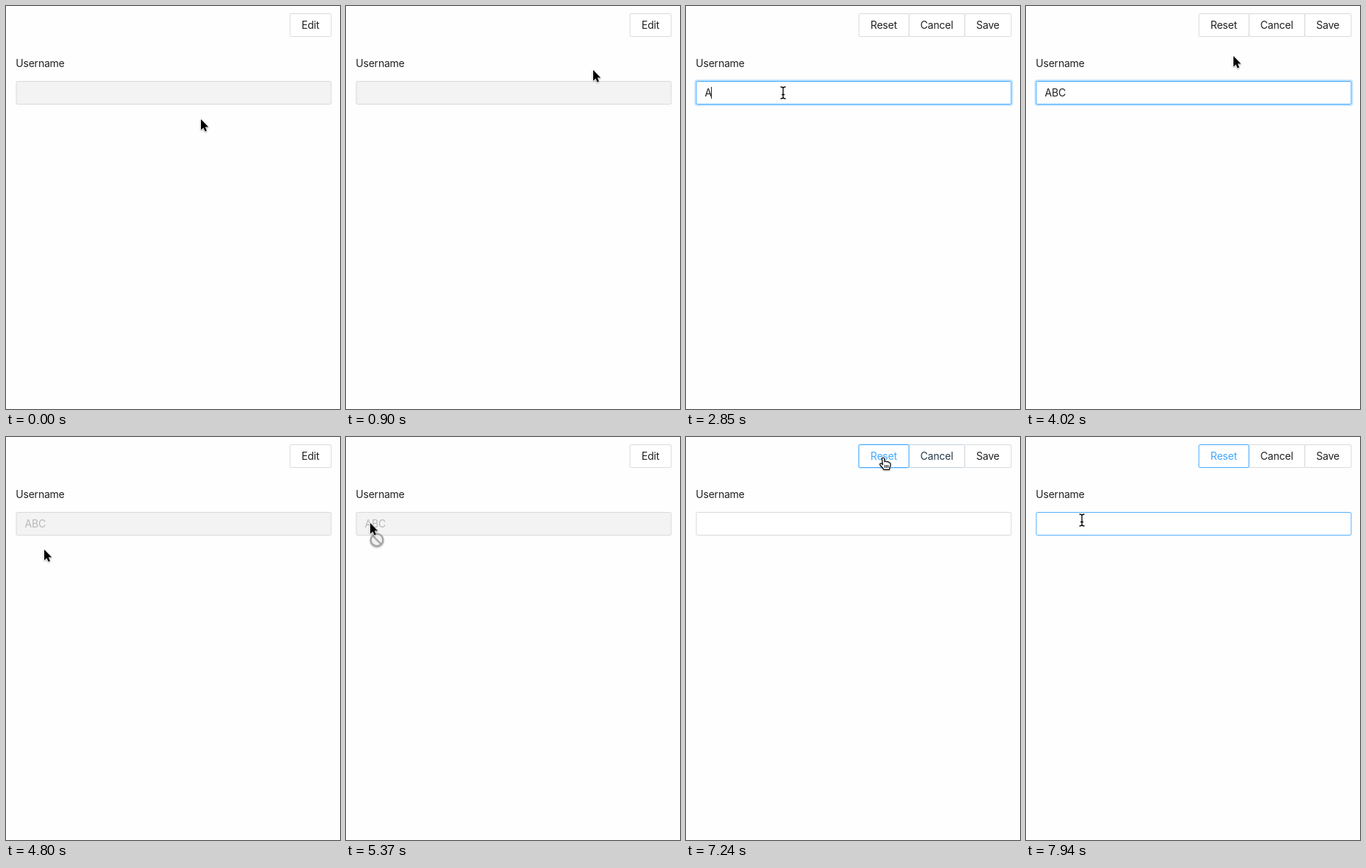
Recreate the animation shown at these times as an HTML page. Size 454 by 548 pixels, loop 8 s.

```html
<!DOCTYPE html>
<html lang="en">
<head>
<meta charset="utf-8">
<title>Editable form</title>
<style>
  html, body { margin: 0; width: 100%; height: 100%; overflow: hidden; background: #fefefe; }
  svg { display: block; width: 454px; height: 548px; }
  text { font: 14px Inter, Roboto, sans-serif; letter-spacing: -.22px; fill: #222; }
  .btn text { text-anchor: middle; }
  .btn rect { fill: #fff; }
  .arrow { fill: #000; stroke: #fff; stroke-width: 1; paint-order: stroke; filter: drop-shadow(0 1px 1px rgba(0,0,0,.35)); }
  .hand { fill: #fff; stroke: #000; stroke-width: 1.2; stroke-linejoin: round; filter: drop-shadow(0 1px 1px rgba(0,0,0,.3)); }
  .badge { fill: #f0f0f0; stroke: #a6a6a6; stroke-width: 2.4; filter: drop-shadow(0 1px 1px rgba(0,0,0,.3)); }
  .beam { fill: none; stroke: #000; stroke-width: 1.3; }
  .halo { stroke: #fff; stroke-width: 3; }
</style>
</head>
<body>
<svg viewBox="0 0 454 548">
  <rect id="wave" fill="none" stroke="#1890ff"/>
  <g id="buttons"></g>
  <text x="13.3" y="83">Username</text>
  <rect id="glow" x="12.5" y="101" width="431" height="34" rx="3" fill="none" stroke="#1890ff" stroke-width="2"/>
  <rect id="field" x="14" y="102.5" width="428" height="31" rx="1.5"/>
  <text id="value" x="25.5" y="123"></text>
  <path id="caret" d="M0 110v16" stroke="#222"/>
  <g id="pointer">
    <g id="denied" class="badge">
      <circle cx="9" cy="23" r="8.3"/>
      <path d="M3 17L15 29"/>
    </g>
    <path id="arrow" class="arrow" d="M0 0V14.5L3.4 11.4 5.6 16.6 7.9 15.6 5.7 10.5H10.2Z"/>
    <g id="hand" class="hand">
      <path d="M-1.6 1.5Q-1.5 0 0 0Q1.3 0 1.5 1.5L2 5.6Q2.6 4.6 3.9 5Q4.9 5.2 5 6Q6 5.2 7.1 5.8Q7.8 6.2 7.9 7Q9.6 6.6 10 8.4Q10 11 9 13L8.5 16.3H1Q-.5 14 -3.8 10.5Q-5 8.8 -3.8 8Q-2.4 7.6 -.6 9.6Z"/>
      <path d="M2.2 10v4M4.4 10v4M6.6 10v4" stroke-width="1"/>
    </g>
    <g id="beam" class="beam">
      <path class="halo" d="M-3.5 -8Q-.5 -8 0 -6.5Q.5 -8 3.5 -8M0 -6.5V6.5M-3.5 8Q-.5 8 0 6.5Q.5 8 3.5 8M-2 2.5H2"/>
      <path d="M-3.5 -8Q-.5 -8 0 -6.5Q.5 -8 3.5 -8M0 -6.5V6.5M-3.5 8Q-.5 8 0 6.5Q.5 8 3.5 8M-2 2.5H2"/>
    </g>
  </g>
</svg>
<script>
const LOOP = 8000, FADE = 260;
const OPEN = 1800, FOCUS = 2260, BLUR = 4430, SAVE = 4500, REOPEN = 6940, RESET = 7200;
const TYPING = 2530, KEY_GAP = 385;

const $ = id => document.getElementById(id);
const show = (el, on) => el.setAttribute('visibility', on ? 'visible' : 'hidden');
const set = (el, attrs) => { for (const k in attrs) el.setAttribute(k, attrs[k]); };

const GREY = [217, 217, 217], INK = [34, 34, 34], BLUE = [64, 169, 255], DEEP = [9, 109, 217];
const mix = (a, b, p) => a.map((v, i) => v + (b[i] - v) * p);
const rgb = c => `rgb(${c.map(Math.round)})`;
const smooth = p => p * p * (3 - 2 * p);

// Fades a yes/no state: the share of the last FADE ms in which it held.
function fade(state, t, samples = 26) {
  let held = 0;
  for (let i = 0; i < samples; i++) held += state(t - i * FADE / samples);
  return smooth(held / samples);
}

// Where the pointer rests, and when it travels there.
const start = { x: 265, y: 154 };
const moves = [
  { from: 360, to: 1400, x: 398, y: 28 },
  { from: 1900, to: 2200, x: 132, y: 118 },
  { from: 3480, to: 4480, x: 400, y: 29 },
  { from: SAVE, to: 4800, x: 52, y: 153 },
  { from: 5170, to: 5370, x: 33, y: 117 },
  { from: 5370, to: 5550, x: 46, y: 119 },
  { from: 5910, to: 6380, x: 415, y: 27 },
  { from: REOPEN, to: 7120, x: 268, y: 28 },
  { from: 7250, to: 7650, x: 95, y: 136 },
  { from: 7700, to: 7940, x: 76, y: 113 }
];

function pointerAt(t) {
  let { x, y } = start;
  for (const m of moves) {
    if (t < m.from) break;
    const p = smooth(Math.min(1, (t - m.from) / (m.to - m.from)));
    x += (m.x - x) * p;
    y += (m.y - y) * p;
  }
  return { x, y };
}

const editing = t => (t >= OPEN && t < SAVE) || t >= REOPEN;
const focused = t => t >= FOCUS && t < BLUR;
const pressing = t => [OPEN, REOPEN].some(click => t < click && t >= click - 90);
const resetFocused = t => (t >= OPEN && t < FOCUS) || t >= REOPEN;

function over(t, left, right, top, bottom) {
  const { x, y } = pointerAt(t);
  return x > left && x < right && y > top && y < bottom;
}
const overField = t => over(t, 13, 443, 102, 134);
const overButton = (b, t) => b.edit === editing(t) && over(t, b.left, b.right, 10, 42);
const fieldActive = t => editing(t) && (focused(t) || overField(t));

const buttons = [
  { label: 'Edit', left: 386, right: 442, edit: false },
  { label: 'Cancel', left: 303, right: 379, edit: true },
  { label: 'Save', left: 379, right: 442, edit: true },
  { label: 'Reset', left: 235, right: 303, edit: true }
];
$('buttons').innerHTML = buttons.map(b => `<g class="btn">
  <rect x="${b.left}" y="10.5" width="${b.right - b.left}" height="31" rx="1.5"/>
  <text x="${(b.left + b.right) / 2 - .2}" y="31">${b.label}</text></g>`).join('');
buttons.forEach((b, i) => {
  b.el = $('buttons').children[i];
  [b.box, b.text] = b.el.children;
  b.active = t => overButton(b, t) || (b.label === 'Reset' && resetFocused(t));
});

function drawButtons(t) {
  const accent = mix(BLUE, DEEP, fade(pressing, t));
  for (const b of buttons) {
    show(b.el, b.edit === editing(t));
    const blue = fade(b.active, t), tone = b.edit ? BLUE : accent;
    b.box.style.stroke = rgb(mix(GREY, tone, blue));
    b.text.style.fill = rgb(mix(INK, tone, blue));
  }
  const click = [OPEN, REOPEN, RESET].filter(c => c <= t).pop();
  const p = (t - click) / 400, grow = 3 * p;
  show($('wave'), p < 1);
  if (p < 1) set($('wave'), {
    x: 234.5 - grow, y: 10 - grow, width: 69 + 2 * grow, height: 32 + 2 * grow, rx: 2 + grow,
    'stroke-width': 2 * grow, opacity: .4 * (1 - p)
  });
}

function drawField(t) {
  const enabled = fade(editing, t);
  set($('field'), {
    fill: rgb(mix([243, 243, 243], [255, 255, 255], enabled)),
    stroke: rgb(mix(GREY, BLUE, fade(fieldActive, t)))
  });
  $('glow').setAttribute('opacity', .25 * fade(focused, t));

  const typed = t < RESET ? Math.min(3, Math.max(0, Math.floor((t - TYPING) / KEY_GAP) + 1)) : 0;
  const value = 'ABC'.slice(0, typed);
  if ($('value').textContent !== value) $('value').textContent = value;
  $('value').style.fill = rgb(mix([184, 184, 184], INK, enabled));

  const lastKey = typed ? TYPING + (typed - 1) * KEY_GAP : FOCUS;
  const caretOn = focused(t) && (t - lastKey) % 1000 < 500;
  show($('caret'), caretOn);
  if (caretOn) {
    const width = typed ? $('value').getComputedTextLength() : 0;
    $('caret').setAttribute('transform', `translate(${Math.round(25 + width) + .5} 0)`);
  }
}

function drawPointer(t) {
  const { x, y } = pointerAt(t);
  const inField = overField(t), beam = inField && editing(t);
  const hand = buttons.some(b => overButton(b, t));
  const visible = t < 2970 || t >= 3480;
  $('pointer').setAttribute('transform', `translate(${Math.round(x)} ${Math.round(y)})`);
  show($('beam'), visible && beam);
  show($('hand'), visible && hand);
  show($('arrow'), visible && !beam && !hand);
  show($('denied'), visible && inField && !beam);
}

const origin = performance.now();
function frame() {
  const t = (performance.now() - origin) % LOOP;
  drawButtons(t);
  drawField(t);
  drawPointer(t);
  requestAnimationFrame(frame);
}
frame();
</script>
</body>
</html>
```
